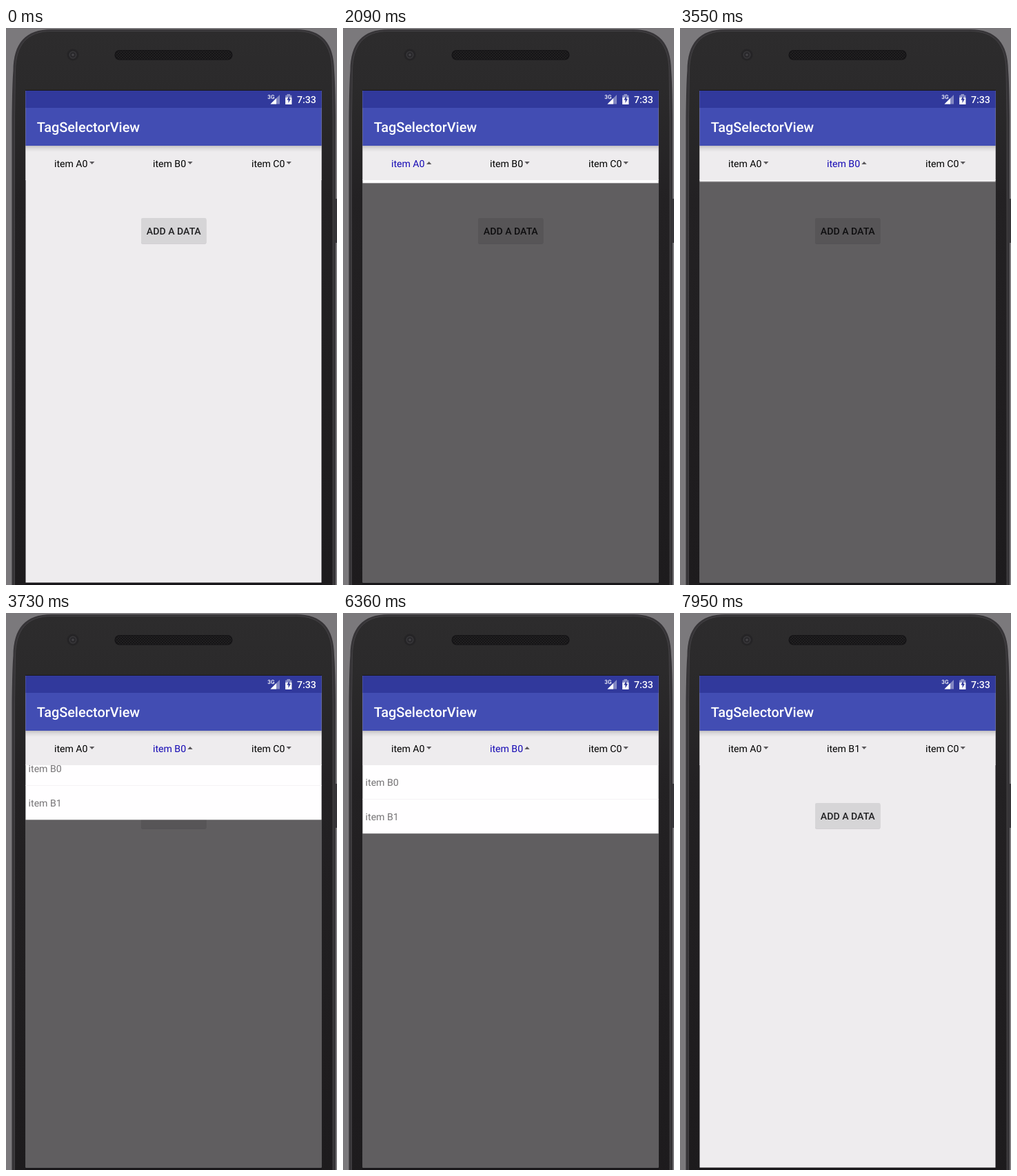
These frames come from a looping animation (480 by 809 pixels, 8000 ms). An HTML page:

```html
<!DOCTYPE html>
<html lang="en">
<head>
<meta charset="utf-8">
<title>TagSelectorView</title>
<style>
  html, body { margin: 0; width: 100%; height: 100%; overflow: hidden; background: #7b797c; }
  svg { display: block; width: 100vw; height: 100vh; }
  text { font-family: Roboto, sans-serif; font-size: 14.1px; text-rendering: geometricPrecision; }
  .medium { font-weight: 500; }
  .row { fill: #757375; }
  .blue { fill: #1509b4; }
  .arrow { fill: #5b595c; }

  .slide { animation: 8s linear infinite; transform: translateY(-100px); }
  .slide.a { animation-name: slide-a; }
  .slide.b { animation-name: slide-b; }
  .switch { animation: 8s step-end infinite; }
  .dim { animation-name: dim; }
  .a-open { animation-name: a-open; }
  .a-closed { animation-name: a-closed; }
  .b-open { animation-name: b-open; }
  .b-closed { animation-name: b-closed; }
  .before { animation-name: before; }
  .after { animation-name: after; }

  @keyframes slide-a {
    0% { transform: translateY(-100px); }
    25.6% { transform: translateY(-100px); animation-timing-function: cubic-bezier(.37, 0, .63, 1); }
    29.35% { transform: none; }
    34.97% { transform: none; animation-timing-function: cubic-bezier(.37, 0, .63, 1); }
    38.72%, 100% { transform: translateY(-100px); }
  }
  @keyframes slide-b {
    0% { transform: translateY(-100px); }
    44% { transform: translateY(-100px); animation-timing-function: cubic-bezier(.37, 0, .63, 1); }
    47.75% { transform: none; }
    94.8% { transform: none; animation-timing-function: cubic-bezier(.37, 0, .63, 1); }
    98.55%, 100% { transform: translateY(-100px); }
  }
  @keyframes dim {
    0%, 38.72%, 98.55%, 100% { opacity: 0; }
    25.6%, 44% { opacity: 1; }
  }
  @keyframes a-open { 0%, 38.72%, 100% { opacity: 0; } 25.6% { opacity: 1; } }
  @keyframes a-closed { 0%, 38.72%, 100% { opacity: 1; } 25.6% { opacity: 0; } }
  @keyframes b-open { 0%, 98.55%, 100% { opacity: 0; } 44% { opacity: 1; } }
  @keyframes b-closed { 0%, 98.55%, 100% { opacity: 1; } 44% { opacity: 0; } }
  @keyframes before { 0% { opacity: 1; } 91.25%, 100% { opacity: 0; } }
  @keyframes after { 0% { opacity: 0; } 91.25%, 100% { opacity: 1; } }
</style>
</head>
<body>
<svg viewBox="0 0 480 809" preserveAspectRatio="none">
  <defs>
    <linearGradient id="body" x1="0" y1="0" x2="0" y2="1">
      <stop offset="0" stop-color="#2d2c2d"/>
      <stop offset=".1" stop-color="#2b2a2b"/>
      <stop offset=".3" stop-color="#232123"/>
      <stop offset="1" stop-color="#1d1b1d"/>
    </linearGradient>
    <linearGradient id="shadow" x1="0" y1="0" x2="0" y2="1">
      <stop offset="0" stop-opacity=".19"/>
      <stop offset=".4" stop-opacity=".08"/>
      <stop offset="1" stop-opacity="0"/>
    </linearGradient>
    <pattern id="mesh" width="4" height="4" patternUnits="userSpaceOnUse">
      <circle cx="1" cy="1" r=".8" fill="#302e30"/>
      <circle cx="3" cy="3" r=".8" fill="#302e30"/>
    </pattern>
    <clipPath id="list-area"><rect x="28.500" y="220.500" width="429" height="585"/></clipPath>
    <path id="down" class="arrow" d="M0 194h7.400l-3.700 4z"/>
    <path id="up" class="arrow" d="M0 198h7.400l-3.700-4z"/>
  </defs>

  <!-- Phone -->
  <rect width="480" height="809" fill="#7b797c"/>
  <path d="M478 248h2v64h-2z" fill="#38363a"/>
  <path d="M8.500 820V130Q9 80 10.500 62C11 22 28 2 66 2H420.500C458.500 2 475.500 22 476 62Q477.500 80 478 130V820z" fill="#363437"/>
  <path d="M12.500 820V130L13.500 62C14 25 30 4.500 66 4.500H420.500C456.500 4.500 472.500 25 473 62L474 130V820z" fill="url(#body)" stroke="#444245"/>
  <rect x="28" y="90" width="430" height="719" fill="#19171a"/>
  <circle cx="97" cy="39" r="8.500" fill="#252426"/>
  <circle cx="97" cy="39" r="5.500" fill="#39383b"/>
  <circle cx="97" cy="39" r="4" fill="#29282b"/>
  <circle cx="97" cy="39" r="1.800" fill="#454448"/>
  <rect x="157.500" y="32" width="171" height="14.500" rx="7" fill="#151416"/>
  <rect x="159" y="33" width="168" height="12.500" rx="6" fill="url(#mesh)"/>

  <!-- Content -->
  <rect x="28.500" y="91" width="429" height="714.500" fill="#eeecee"/>
  <rect x="196" y="277" width="94.500" height="36.700" rx="2" fill="#cac8cb"/>
  <rect x="196" y="276" width="94.500" height="37" rx="2" fill="#d6d5d7"/>
  <text class="medium" x="243.300" y="299.600" text-anchor="middle" fill="#202022">ADD A DATA</text>

  <!-- Dropdowns -->
  <rect class="switch dim" x="28.500" y="221" width="429" height="584.500" fill="rgba(2,0,3,.6)"/>
  <g clip-path="url(#list-area)">
    <g class="slide a">
      <rect x="28.500" y="221" width="429" height="99.300" fill="#fffeff"/>
      <rect x="28.500" y="270" width="429" height="1" fill="#f5f3f5"/>
      <text class="row" x="32.600" y="251.200">item A0</text>
      <text class="row" x="32.600" y="301.200">item A1</text>
    </g>
    <g class="slide b">
      <rect x="28.500" y="221" width="429" height="99.300" fill="#fffeff"/>
      <rect x="28.500" y="270" width="429" height="1" fill="#f5f3f5"/>
      <text class="row" x="32.600" y="251.200">item B0</text>
      <text class="row" x="32.600" y="301.200">item B1</text>
      <path class="switch after" d="M442.700 296L447 300.300L456.500 291" fill="none" stroke="#d4566a" stroke-width="1.700"/>
    </g>
  </g>

  <!-- Tabs -->
  <rect x="28.500" y="171" width="429" height="50" fill="#eeecee"/>
  <g class="switch a-closed"><text x="70" y="201.500">item A0</text><use href="#down" x="121"/></g>
  <g class="switch a-open"><text class="blue" x="70" y="201.500">item A0</text><use href="#up" x="121"/></g>
  <g class="switch b-closed">
    <text class="switch before" x="213" y="201.500">item B0</text>
    <text class="switch after" x="213" y="201.500">item B1</text>
    <use href="#down" x="263.300"/>
  </g>
  <g class="switch b-open">
    <text class="switch before blue" x="213" y="201.500">item B0</text>
    <text class="switch after blue" x="213" y="201.500">item B1</text>
    <use href="#up" x="263.300"/>
  </g>
  <text x="356" y="201.500">item C0</text><use href="#down" x="406.500"/>

  <!-- App bar -->
  <rect x="28.500" y="171" width="429" height="9" fill="url(#shadow)"/>
  <rect x="28.500" y="91" width="429" height="80" fill="#424db3"/>
  <rect x="28.500" y="91" width="429" height="25" fill="#31399c"/>
  <text class="medium" x="44.700" y="151.200" fill="#fff" style="font-size:19.900px">TagSelectorView</text>
  <g fill="#fff">
    <text class="medium" x="379.300" y="102.500" style="font-size:8.200px">3G</text>
    <path d="M397 97V110.500H383.500z" opacity=".4"/>
    <path d="M392 102V110.500H383.500z"/>
    <path d="M407.500 96h4.500v1.700h2.300v13.300h-9.100V97.700h2.300z" opacity=".45"/>
    <path d="M405.200 101h9.100v10h-9.100z"/>
    <path d="M411 98.500l-3.700 6h2.200v4.500l3.500-6.300h-2z" fill="#31399c"/>
    <text class="medium" x="421.900" y="108.700">7:33</text>
  </g>
</svg>
</body>
</html>
```
